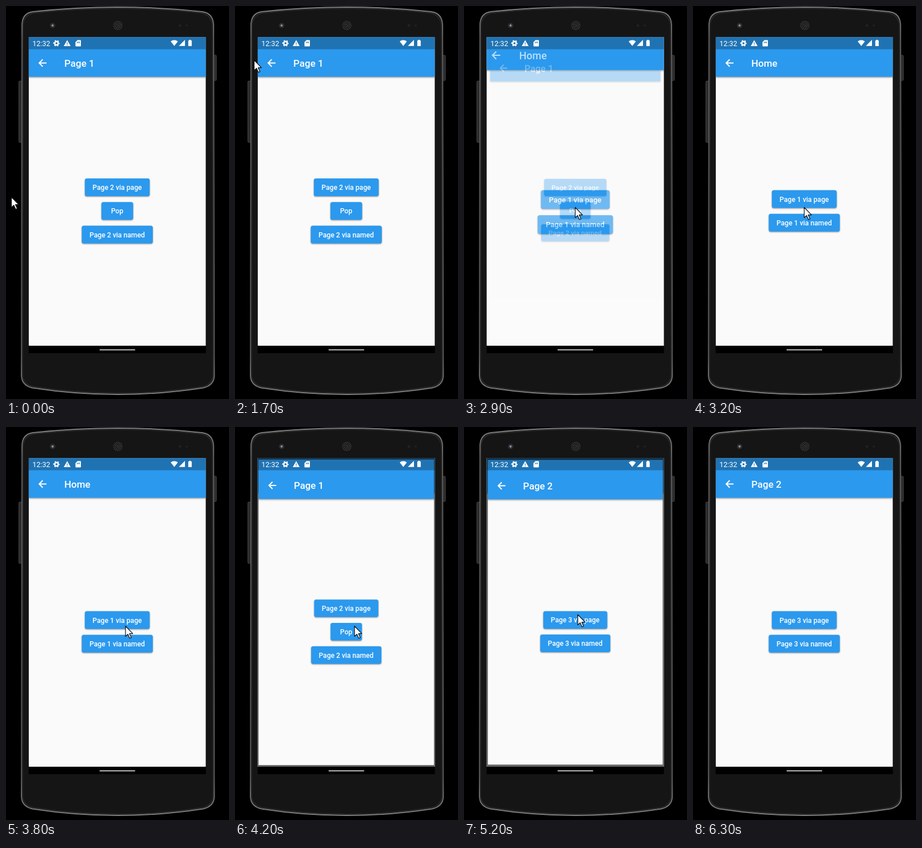
Write an HTML page that moves like this. It is 390x686 px and loops after 7.1 s.

```html
<!DOCTYPE html>
<html lang="en">
<head>
<meta charset="utf-8">
<title>Page navigation</title>
<style>
  html, body { margin: 0; width: 100%; height: 100%; overflow: hidden; background: #000; }
  svg { display: block; width: 100%; height: 100%; }
  text { font-family: Roboto, "Noto Sans", sans-serif; fill: #fff; }
  .title { font-size: 17px; font-weight: 500; }
  .label { font-size: 12.2px; font-weight: 500; text-anchor: middle; }
  .bar { fill: #2b99ee; filter: drop-shadow(0 1.5px 1.6px rgba(0, 0, 0, .48)); }
  .button { fill: #2b99ee; filter: drop-shadow(0 1.2px 1px rgba(0, 0, 0, .42)); }
</style>
</head>
<body>
<svg viewBox="0 0 390 686">
  <defs>
    <clipPath id="screen"><rect x="39.600" y="54.300" width="310" height="538.700"/></clipPath>
    <linearGradient id="rim" x1="0" y1="0" x2="0" y2="1">
      <stop offset="0" stop-color="#808080"/>
      <stop offset=".08" stop-color="#5c5c5c"/>
      <stop offset=".9" stop-color="#565656"/>
      <stop offset="1" stop-color="#808080"/>
    </linearGradient>
  </defs>

  <rect width="390" height="686" fill="#000"/>

  <!-- phone -->
  <g fill="#2a2a2a" stroke="#525252" stroke-width=".8">
    <rect x="22.500" y="131" width="5" height="107" rx="1.500"/>
    <rect x="363" y="86" width="5" height="44" rx="1.500"/>
  </g>
  <path fill="#151515" stroke="url(#rim)" stroke-width="2"
    d="M28 34 Q28 12.500 47 10 Q195 -6 343 10 Q362.500 12.500 363 34
       L364.300 644 Q364.300 662 345 666.500 Q195 689.500 46 666.500 Q27 662 27 644 Z"/>
  <path fill="none" stroke="#2c2c2c" stroke-width="1.300"
    d="M30 36 Q30 15 50 12 Q195 -3.500 340 12 Q360.500 15 361 36
       L362.300 642 Q362.300 660 343 664.500 Q195 687 48 664.500 Q29 660 29 642 Z"/>
  <circle cx="81.500" cy="34" r="4" fill="#25252a" stroke="#3a3a3a"/>
  <circle cx="81.500" cy="34" r="2" fill="#8a8c9c"/>
  <g fill="none" stroke="#4c4c4c" stroke-width="1.500" stroke-dasharray="1.500 1.300">
    <circle cx="195.500" cy="34" r="7.200"/>
    <circle cx="195.500" cy="34" r="4.500"/>
    <circle cx="195.500" cy="34" r="1.800"/>
  </g>
  <g fill="#212121">
    <circle cx="304" cy="34" r="2.500"/>
    <circle cx="316" cy="34" r="2"/>
  </g>
  <rect x="39.600" y="54" width="310" height="552" fill="#000"/>

  <g id="app" clip-path="url(#screen)"></g>

  <!-- system bars -->
  <rect x="39.600" y="54" width="310" height="21.500" fill="#000" opacity=".25"/>
  <text x="46.200" y="69.500" font-size="12.500">12:32</text>
  <g fill="#fff">
    <circle cx="88.300" cy="65" r="3.100" fill="none" stroke="#fff" stroke-width="2.500"/>
    <circle cx="88.300" cy="65" r="4.800" fill="none" stroke="#fff" stroke-width="1.700"
      stroke-dasharray="2.513" stroke-dashoffset="1.250"/>
    <path fill-rule="evenodd" d="M107 59.500 L113 70 H101 Z M106.400 63.500 V66.800 H107.600 V63.500 Z M106.400 67.800 V69 H107.600 V67.800 Z"/>
    <path fill-rule="evenodd" d="M125 59.500 H130 Q131 59.500 131 60.500 V69.500 Q131 70.500 130 70.500 H122.500 Q121.500 70.500 121.500 69.500 V63 Z M124 62.500 V65 H125 V62.500 Z M126 62 V65 H127 V62 Z M128 62 V65 H129 V62 Z"/>
    <path d="M288 61.800 Q294.300 57.300 300.600 61.800 L294.300 69.800 Z"/>
    <path d="M313 59 V69.800 H302.300 Z"/>
    <path d="M320.300 59 H323.300 V60.200 H324.800 V70 H318.800 V60.200 H320.300 Z"/>
  </g>
  <rect x="163.500" y="599.500" width="62.500" height="1.600" rx=".8" fill="#eee"/>

  <path id="cursor" fill="#fff" stroke="#111" stroke-width="1.200" stroke-linejoin="round"
    d="M.5 .5 V18.500 L4.700 14.700 L7.900 21.800 L10.600 20.600 L7.500 13.700 H13.200 Z"/>
</svg>

<script>
const LOOP = 7100, STEP = 100, SLIDE = 300;
const CX = 194.6, CY = 323.5;
const NS = "http://www.w3.org/2000/svg";
const SCREEN = { x: 39.6, y: 54, width: 310, height: 539 };
const app = document.getElementById("app");
const cursor = document.getElementById("cursor");

function add(parent, tag, attrs, text) {
  const el = document.createElementNS(NS, tag);
  for (const key in attrs) el.setAttribute(key, attrs[key]);
  if (text) el.textContent = text;
  parent.appendChild(el);
  return el;
}

function makePage(title, buttons) {
  const page = add(app, "g", {});
  add(page, "rect", { ...SCREEN, fill: "#fafafa" });
  add(page, "rect", { ...SCREEN, class: "bar", height: 69.5 });
  add(page, "path", {
    d: "M70.800 99.500 H58.300 M64.200 93.300 L58 99.500 L64.200 105.700",
    fill: "none", stroke: "#fff", "stroke-width": 2
  });
  add(page, "text", { class: "title", x: 102, y: 106 }, title);
  buttons.forEach(([label, width], i) => {
    const y = 357.8 + (i - (buttons.length - 1) / 2) * 41.3;
    add(page, "rect", {
      class: "button", x: CX - width / 2, y: y - 15.6, width, height: 31, rx: 3.5
    });
    add(page, "text", { class: "label", x: CX - 0.2, y: y + 4.4 }, label);
  });
  return page;
}

const links = n => [[`Page ${n} via page`, 113.4], [`Page ${n} via named`, 124.2]];
const [viaPage, viaNamed] = links(2);
const home = makePage("Home", links(1));
const page1 = makePage("Page 1", [viaPage, ["Pop", 55.5], viaNamed]);
const page2 = makePage("Page 2", links(3));
const pages = [home, page1, page2];
const scrim = add(app, "rect", { ...SCREEN, fill: "#000" });

const moves = [
  { at: 2850, from: page1, to: home, pop: true },
  { at: 4055, from: home, to: page1 },
  { at: 5066, from: page1, to: page2 }
];

// Cursor runs: start, end, from, to.
const runs = [
  [0, 700, [9, 333], [9, 333]],
  [700, 900, [9, 333], [22, 303]],
  [1700, 1800, [33, 94], [58, 91]],
  [1800, 2300, [58, 91], [227, 346]],
  [2400, 2700, [227, 346], [194, 351]],
  [3200, 3600, [194, 351], [227, 363]],
  [3600, 3800, [227, 363], [208.5, 347]],
  [4300, 4600, [208.5, 347], [198.5, 327]],
  [5400, 5700, [198.5, 327], [27, 320]],
  [5900, 6200, [27, 320], [30, 10]]
];
// Spans with no cursor.
const gaps = [[1000, 1700], [6300, LOOP]];

const clamp = v => Math.max(0, Math.min(1, v));
const mix = (a, b, k) => a + (b - a) * k;
const part = (t, a, b) => clamp((t - a) / (b - a));
const smooth = k => k * k * (3 - 2 * k);

function bezier(x1, y1, x2, y2, x) {
  const at = (a, b, u) => 3 * (1 - u) * (1 - u) * u * a + 3 * (1 - u) * u * u * b + u * u * u;
  let lo = 0, hi = 1;
  for (let i = 0; i < 24; i++) {
    const mid = (lo + hi) / 2;
    if (at(x1, x2, mid) < x) lo = mid; else hi = mid;
  }
  return at(y1, y2, lo);
}

// Quick start, then a very slow settling.
function zoomCurve(t) {
  const split = 1 / 6;
  return t < split
    ? 0.4 * bezier(0.05, 0, 0.1333, 0.06, t / split)
    : 0.4 + 0.6 * bezier(0.2083, 0.82, 0.25, 1, (t - split) / (1 - split));
}

function show(page, scale, alpha) {
  page.style.display = "";
  page.setAttribute("opacity", alpha);
  page.setAttribute("transform",
    `translate(${CX} ${CY}) scale(${scale}) translate(${-CX} ${-CY})`);
  app.appendChild(page);
}

function drawPages(t) {
  pages.forEach(p => { p.style.display = "none"; });
  scrim.setAttribute("opacity", 0);
  const move = moves.filter(m => m.at <= t).pop();
  if (!move) return show(page1, 1, 1);
  const k = (t - move.at) / SLIDE;
  if (k >= 1) return show(move.to, 1, 1);
  const z = zoomCurve(k);
  if (move.pop) {
    show(move.to, mix(1.1, 1, z), 1);
    show(move.from, mix(1, 0.9, z), 1 - part(k, 0.0825, 0.2075));
  } else {
    show(move.from, mix(1, 1.05, z), 1);
    scrim.setAttribute("opacity", 0.6 * part(k, 0.2075, 0.4175));
    app.appendChild(scrim);
    show(move.to, mix(0.85, 1, z), part(k, 0.125, 0.25));
  }
}

function drawCursor(t) {
  const hidden = gaps.some(([a, b]) => t >= a && t < b);
  cursor.style.display = hidden ? "none" : "";
  const [start, end, a, b] = runs.filter(r => r[0] <= t).pop();
  const k = smooth(part(t, start, end));
  cursor.setAttribute("transform", `translate(${mix(a[0], b[0], k)} ${mix(a[1], b[1], k)})`);
}

let last = -1;
const begin = performance.now();

function frame(now) {
  const t = Math.floor((Math.max(0, now - begin) % LOOP) / STEP) * STEP;
  if (t !== last) {
    drawPages(t);
    drawCursor(t);
    last = t;
  }
  requestAnimationFrame(frame);
}
frame(begin);
</script>
</body>
</html>
```
